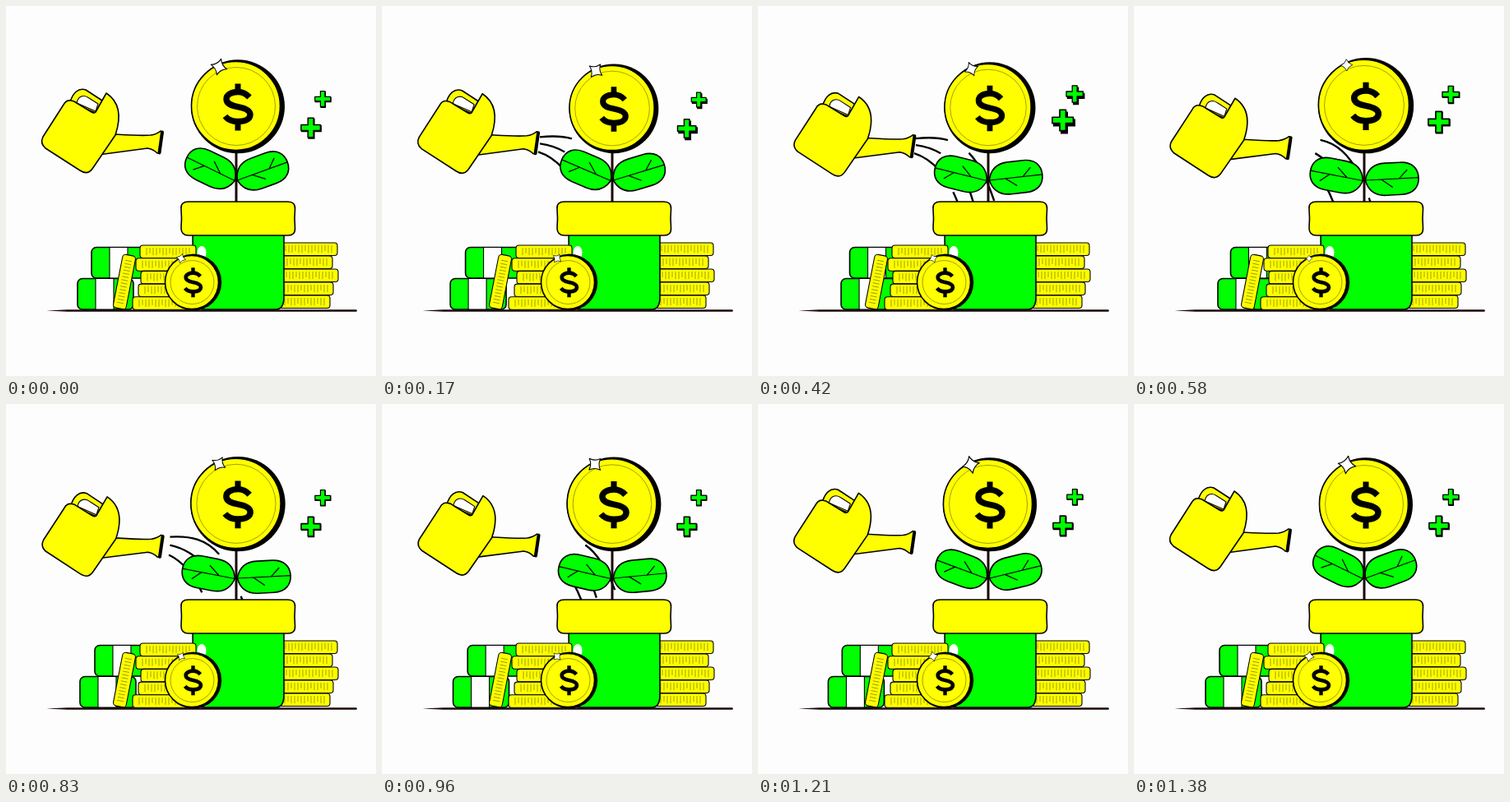
Animation, 450 px wide and 450 px high, one loop 1.43 s. Source, as an HTML page:

```html
<!DOCTYPE html>
<html lang="en">
<head>
<meta charset="utf-8">
<title>Growing money</title>
<style>
  html, body { margin: 0; width: 100%; height: 100%; overflow: hidden; background: #fdfdfd; }
  svg { display: block; width: 100%; height: 100%; }
  .y { fill: #ff0; }
  .g { fill: #0f0; }
  .w { fill: #fff; }
  .y, .g, .w { stroke: #000; stroke-width: 1.6; stroke-linejoin: round; }
  .w, .row { stroke-width: 1.1; }
  .thin { fill: none; stroke: #770; stroke-width: .7; }
  .ink { fill: none; stroke: #000; }
</style>
</head>
<body>
<svg viewBox="0 0 450 450">
  <defs>
    <g id="dollar" class="ink">
      <path stroke-width="7.4" d="M14-11.5C10-16 5-18 0-18C-8-18-14-14.5-14-9.5C-14-3.5-8-1.5 0 0C8 1.5 15 4 15 9.5C15 15 9 18 0 18C-6 18-12 16-15.5 11.5"/>
      <path stroke-width="7" d="M0-28V-18M0 18V29"/>
    </g>
    <path id="star" class="w" d="M0-10Q2.5-2.5 10 0Q2.5 2.5 0 10Q-2.5 2.5-10 0Q-2.5-2.5 0-10Z"/>
    <path id="cross" d="M-3.5-12H3.5V-3.5H12V3.5H3.5V12H-3.5V3.5H-12V-3.5H-3.5Z"/>
    <g id="leaf">
      <path class="g" d="M0 0C-3-13-12-19-24-19H-42C-56-19-63-11-63 0C-63 11-56 19-42 19H-24C-12 19-3 13 0 0Z"/>
      <path class="ink" stroke-width="1.2" d="M-63 0H0M-40 0L-50 10M-19 0L-32-10"/>
    </g>
    <g id="note">
      <rect class="g" width="68" height="37.5" rx="6"/>
      <path class="w" d="M22 0H44V37.5H22Z"/>
    </g>
  </defs>

  <g id="water" class="ink" stroke-width="2.4">
    <path pathLength="1" d="M192 159C240 154 265 168 288 237"/>
    <path pathLength="1" d="M192 167Q245 174 262 237"/>
    <path pathLength="1" d="M190 177Q224 188 243 237"/>
  </g>

  <g id="can">
    <path class="y" d="M133 156C150 157 165 158 176 157Q183 156 188 152L190 153L186 179L184 179Q179 174 172 173L112 181Z"/>
    <path class="ink" stroke-width="4" stroke-linecap="round" d="M190 153.5L186.5 178.5"/>
    <path class="y" d="M78 117C81 106 88 99 97 102L117 115L109 130Z"/>
    <path class="w" d="M86 118C88 108 96 108 101 112L112 119L109 128Z"/>
    <path class="y" d="M79 115Q73 114 70 120L45 159Q41 167 48 173L90 200Q99 206 105 198L133 157Q145 121 122 106L109 129Q107 131 104 129L86 118Q82 115 79 115Z"/>
  </g>

  <path fill="#1c0808" d="M49 370.5L75 369.3H426Q428 370.6 426 371.8H75Z"/>
  <use id="noteTop" href="#note"/>
  <use id="noteLow" href="#note"/>
  <g id="rightStack"></g>

  <path class="ink" stroke-width="3" style="stroke:#1c0808" d="M280 176V239"/>
  <use id="leftLeaf" href="#leaf"/>
  <use id="rightLeaf" href="#leaf"/>
  <g id="bloom">
    <circle cx="282" cy="122.3" r="57"/>
    <circle class="y" cx="279.5" cy="121.5" r="54"/>
    <circle class="thin" cx="280" cy="122" r="47.5"/>
    <use href="#dollar" x="282" y="122.5"/>
    <use id="bigStar" href="#star"/>
  </g>

  <path class="g" d="M227 276L228 350Q228 369 242 369H328Q338 369 338 354V276Z"/>
  <ellipse cx="238" cy="300" rx="5.5" ry="8" fill="#fff"/>
  <path class="y" d="M222 238H343Q352 238 351.5 247Q350.5 258 351.5 270Q352 279 343 279H222Q213 279 213 270Q214 258 213 247Q212 238 222 238Z"/>

  <g id="leftStack"></g>
  <g transform="translate(144 335.5) rotate(11)">
    <rect class="y row" x="-8" y="-33" width="16" height="66" rx="4"/>
    <path class="thin" id="ticks"/>
  </g>
  <circle cx="227.7" cy="336" r="34.5"/>
  <circle class="y" cx="226" cy="336" r="32.5"/>
  <circle class="thin" cx="226.5" cy="336" r="26.5"/>
  <use href="#dollar" transform="translate(227.5 336) scale(.63)"/>
  <use id="smallStar" href="#star"/>

  <g id="pluses"></g>
</svg>

<script>
const LOOP = 1430;
const TIMES = [0, 170, 420, 580, 830, 1080, 1380];
const $ = id => document.getElementById(id);
const move = (id, value) => $(id).setAttribute('transform', value);

// Periodic smooth curve through one value per entry of TIMES.
function curve(...values) {
  const n = TIMES.length;
  const at = i => TIMES[(i + n) % n] + Math.floor(i / n) * LOOP;
  const val = i => values[(i + n) % n];
  const slope = i => (val(i + 1) - val(i - 1)) / (at(i + 1) - at(i - 1));
  return t => {
    let i = n - 1;
    while (TIMES[i] > t) i--;
    const span = at(i + 1) - at(i), u = (t - at(i)) / span, v = 1 - u;
    return v * v * ((1 + 2 * u) * val(i) + u * span * slope(i))
         + u * u * ((3 - 2 * u) * val(i + 1) - v * span * slope(i + 1));
  };
}

const canDrop = curve(0, .7, 4.3, 6, 6.6, 4, 0);
const leafDrop = curve(0, .18, .8, 1, 1, .65, 0);
const bloomSize = curve(1, .955, .974, 1.02, 1.012, 1.003, 1);
const starSize = curve(1, 1, .9, .7, .9, 1, 1.08);
const noteTopX = curve(104, 101.5, 111.5, 117.5, 108, 102, 104);
const noteLowX = curve(87, 83, 101, 102, 90, 85, 87);
const plusSize = curve(.98, .93, 1.06, 1.06, .97, .98, .98);
const plusShade = curve(1.2, 2.5, 2.8, 1, .8, 1, 1.2);
const bigPlusY = curve(148, 149, 139, 141, 149, 148, 148);
const smallPlusY = curve(113, 114, 107, 107.5, 114, 113, 113);

function coinRow(x, y, width) {
  let ticks = '';
  for (let i = 8; i < width - 6; i += 4) ticks += `M${x + i} ${y + 3}v${i % 3 ? 9 : 7}`;
  return `<rect class="y row" x="${x}" y="${y}" width="${width}" height="15.5" rx="3.5"/>
    <path class="thin" d="${ticks}"/>`;
}
$('rightStack').innerHTML = [403, 397, 404, 398, 394]
  .map((end, i) => coinRow(end - 75, 288 + i * 16, 75)).join('');
$('leftStack').innerHTML = [163, 158, 164, 161, 154]
  .map((x, i) => coinRow(x, 291 + i * 15.7, (i ? 222 : 231) - x)).join('');

let ticks = '';
for (let y = -26; y < 28; y += 4) ticks += `M-4 ${y}h8`;
$('ticks').setAttribute('d', ticks);

function plus(x, y, size, shade) {
  return `<g transform="translate(${x} ${y}) scale(${size})">
    <use href="#cross" transform="translate(${shade * .6} ${shade})" stroke="#000" stroke-width="1.5"/>
    <use href="#cross" class="g"/></g>`;
}

const STREAMS = [
  { speed: .0028, length: .48 },
  { speed: .003, length: .5 },
  { speed: .0045, length: .75 },
];
const SPURTS = [641, 320, 70];

function drawWater(t) {
  STREAMS.forEach(({ speed, length }, i) => {
    const path = $('water').children[i];
    let end = 0;
    const pattern = [0];
    for (const start of SPURTS) {
      const front = (t - start) * speed;
      const tail = Math.max(end, front - length), head = Math.min(1, front);
      if (head <= tail) continue;
      pattern.push(tail - end, head - tail);
      end = head;
    }
    path.style.strokeDasharray = [...pattern, 2].join(' ');
    path.style.visibility = end ? 'visible' : 'hidden';
  });
}

function draw(now) {
  const t = now % LOOP;
  const can = canDrop(t), drop = leafDrop(t), size = bloomSize(t);
  const spin = 15 + 180 * t / LOOP, star = starSize(t);
  move('can', `translate(${can / 10} ${can}) rotate(${can / 15} 90 155)`);
  move('water', `translate(0 ${can / 2})`);
  move('leftLeaf', `translate(278.3 212.5) rotate(${26 - 15 * drop}) scale(1.03)`);
  move('rightLeaf', `translate(281.3 212) rotate(${-20 + 17 * drop}) scale(-1.03)`);
  move('bloom', `translate(281 178) scale(${size}) translate(-281 -178)`);
  move('bigStar', `translate(259 74) rotate(${spin}) scale(${star})`);
  move('smallStar', `translate(213 307) rotate(${spin}) scale(${star * .58})`);
  move('noteTop', `translate(${noteTopX(t)} 293.5)`);
  move('noteLow', `translate(${noteLowX(t)} 331.5)`);
  $('pluses').innerHTML = plus(370.7, bigPlusY(t), plusSize(t), plusShade(t))
    + plus(385.2, smallPlusY(t), plusSize(t) * .8, plusShade(t));
  drawWater(t);
  requestAnimationFrame(() => draw(performance.now()));
}
draw(performance.now());
</script>
</body>
</html>
```
